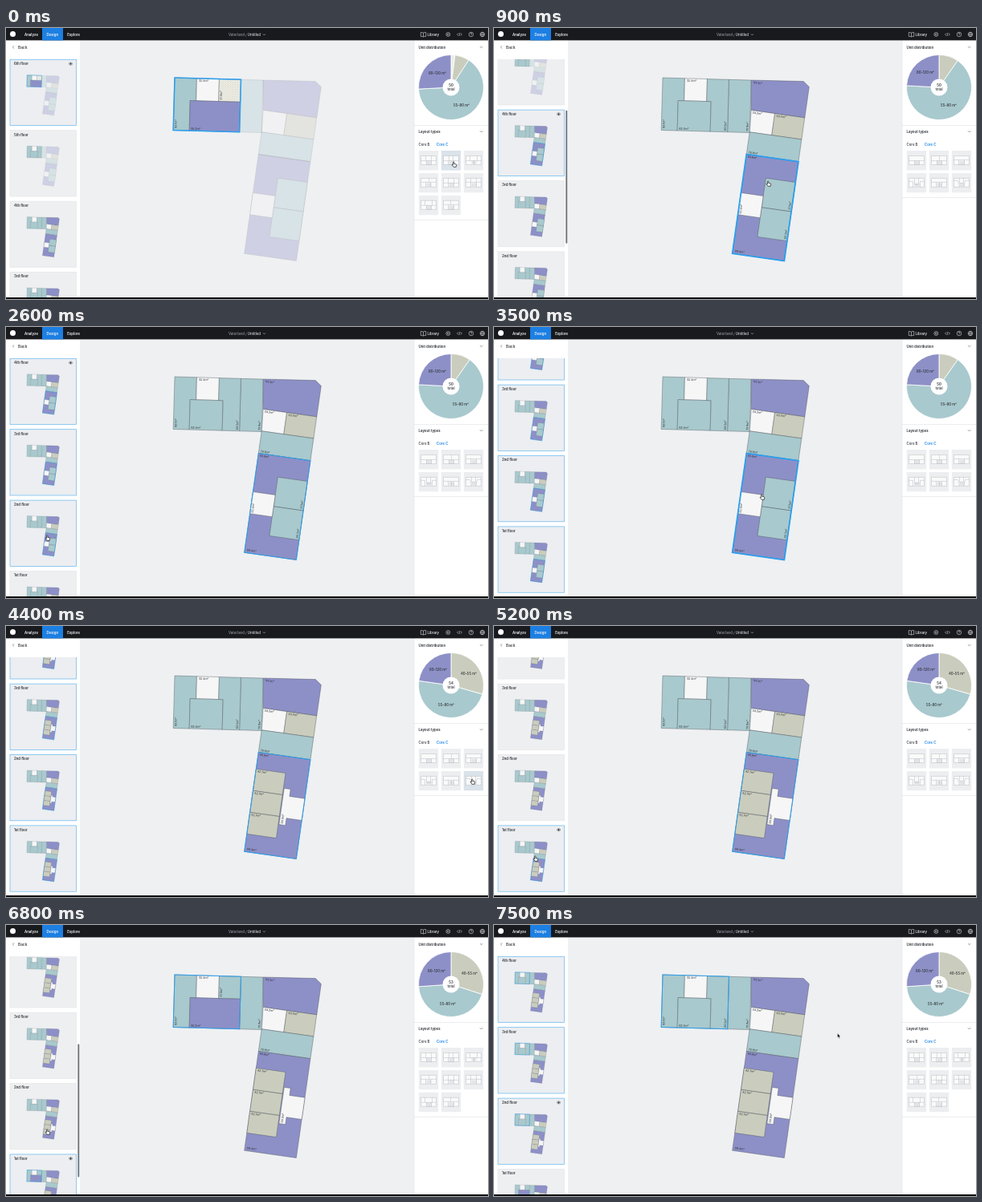
Animation of 600x338 px, one loop 7.6 s. Source, as an HTML page:

```html
<!DOCTYPE html>
<html lang="en">
<head>
<meta charset="utf-8">
<title>Floor plan editor</title>
<style>
html, body { margin: 0; width: 100%; height: 100%; overflow: hidden; background: #eff0f2; }
svg { display: block; width: 600px; height: 338px; }
text { font: 500 4.35px Inter, Roboto, sans-serif; fill: #2b2f34; }
.bold { font-weight: 600; }
.light { fill: #f2f3f5; }
.dim { fill: #9298a0; }
.blue { fill: #1583e9; }
.mid { text-anchor: middle; }
.area { font-size: 3.5px; font-weight: 400; }
.line { fill: none; stroke: #454a50; stroke-width: .55; }
.line.light { stroke: #e4e6e9; fill: none; }
</style>
</head>
<body>
<svg viewBox="0 0 600 338">
  <defs>
    <clipPath id="list"><rect y="39" width="92" height="298"/></clipPath>
    <pattern id="dots" width="3" height="3" patternUnits="userSpaceOnUse">
      <rect width="3" height="3" fill="#eeeee6"/>
      <path d="M0 0h1v1h-1zM1.5 1.5h1v1h-1z" fill="#cfd0bf"/>
    </pattern>
  </defs>
  <rect width="600" height="338" fill="#eff0f2"/>
  <g id="plan"></g>

  <rect y="15" width="92.5" height="323" fill="#fff"/>
  <path d="M92.5 15V338" stroke="#e9ebed" stroke-width=".6"/>
  <path class="line" d="M10 22.4L8.4 24L10 25.6"/>
  <text x="15" y="25.6" style="font-size:4.8px">Back</text>
  <g clip-path="url(#list)"><g id="cards"></g><rect id="bar" x="89.3" width="2" height="166" rx="1" fill="#73777c"/></g>

  <rect x="508" y="15" width="92" height="323" fill="#fff"/>
  <path d="M508 15V338M508 121.5H600" stroke="#e3e5e8" stroke-width=".7"/>
  <text class="bold" x="513.5" y="25.6">Unit distribution</text>
  <text class="bold" x="513.5" y="131">Layout types</text>
  <path class="line" d="M590 23l1.7 1.7l1.7-1.7M590 128.3l1.7 1.7l1.7-1.7"/>
  <text x="513.5" y="146.7">Core B</text>
  <text class="blue bold" x="536" y="146.7">Core C</text>
  <g id="pie"></g>
  <g id="options"></g>

  <rect width="600" height="15.4" fill="#181a1e"/>
  <rect x="45" width="26" height="15.4" fill="#1c7fe3"/>
  <circle cx="8.5" cy="7.6" r="3.5" fill="#fff"/>
  <text class="light bold" x="23" y="9.5">Analyze</text>
  <text class="light bold" x="50.5" y="9.5">Design</text>
  <text class="light bold" x="76.2" y="9.5">Explore</text>
  <text class="dim" x="277" y="9.5">Vaterland / <tspan fill="#d9dce0">Untitled</tspan></text>
  <path class="line light" d="M320 7.5l1.4 1.4l1.4-1.4"/>
  <text class="light" x="524.5" y="9.5">Library</text>
  <g class="line light">
    <path d="M519.5 6v5M516.3 5.5q1.8-.4 3.2.7q1.4-1.1 3.2-.7v5q-1.8-.4-3.2.6q-1.4-1-3.2-.6z"/>
    <circle cx="550.3" cy="8" r="2.5"/><circle cx="550.3" cy="8" r="1"/>
    <path d="M563 6.4L561.6 8L563 9.6M566 6.4L567.4 8L566 9.6M565 6L564 10"/>
    <circle cx="579" cy="8" r="2.8"/><path d="M578.1 7.3q0-1 .9-1t.9.9q0 .6-.9 1.1v.4M579 9.4v.4"/>
    <circle cx="593" cy="8" r="2.8"/><ellipse cx="593" cy="8" rx="1.2" ry="2.8"/><path d="M590.2 8h5.6"/>
  </g>
  <rect y="336" width="600" height="2" fill="#08090a"/>
  <g id="cursor"></g>
</svg>
<script>
const $ = id => document.getElementById(id);
const LOOP = 7600, PITCH = 88.4;
const TEAL = '#a8c9cd', PURPLE = '#8d90c7', SAGE = '#cacdbd', WHITE = '#f6f6f7', BLUE = '#2b9fee';
const LEFT = 'translate(210 62) rotate(1.6)', RIGHT = 'translate(314.3 157.5) rotate(8.1)';

// unit: [path, fill, area, label x, label y, vertical]
const box = (x, y, w, h) => `M${x} ${y}h${w}v${h}h${-w}z`;
const side = ['M0 0h27.5v28h-7.5v37.5h-20z', TEAL, '83.1', 4.2, 63, 1];
const stair = [box(27.5, 0, 28, 28), WHITE, '32.4', 30, 4];
const west = {
  U: [side, stair,
    [box(20, 28, 41, 37.5), TEAL, '63.0', 22, 64],
    ['M55.5 0h27v65.5h-21.5v-37.5h-5.5z', TEAL, '83.5', 80.8, 64, 1]],
  P: [side, stair,
    [box(55.5, 0, 27, 28), 'url(#dots)', '31.9', 59.5, 26, 1],
    [box(20, 28, 62.5, 37.5), PURPLE, '95.2', 22, 64]],
  Q: [side, stair,
    [box(55.5, 0, 27, 28), TEAL, '31.9', 59.5, 26, 1],
    [box(20, 28, 62.5, 37.5), PURPLE, '95.2', 22, 64]]
};
const strip = [[box(82.5, 0, 27.8, 65.5), TEAL, '79.8', 108.3, 64, 1]];
const north = [
  ['M-7.1-92.4L57.5-100L65.4-94.2V-55.3H-2z', PURPLE, '116.1', -4.5, -88.8],
  ['M-2-55.3H27.8V-28H0z', WHITE, '34.2', 0, -51.4],
  [box(27.8, -55.3, 37.5, 27.3), SAGE, '43.0', 30, -51.4],
  [box(0, -28, 65.3, 28), TEAL, '79.8', 2, -1.5]
];
const hall = [box(0, 0, 65.3, 125), PURPLE, '96.8', 1.8, 4];
const hallEnd = ['', PURPLE, '98.4', 2.5, 122.6];
const south = {
  O: [hall, hallEnd,
    [box(28, 26, 37.3, 37), TEAL, '57.1', 63.6, 61, 1],
    [box(28, 63, 37.3, 37), TEAL, '60.7', 63.6, 98, 1],
    [box(0, 48.5, 28, 27.5), WHITE, '52.4', 4, 74.5, 1]],
  N: [hall, hallEnd,
    ...[21, 48.3, 75.6].map(y => [box(0, y, 37, 27.3), SAGE, '42.7', 2, y + 4]),
    ['M38 40h8v9h19.3v27.5h-19.3v9h-8z', WHITE, '36.3', 42.6, 84, 1]]
};

function units(list, frame, pen, labels, alpha = 1) {
  const parts = list.map(([d, fill, area, x, y, up]) =>
    (d && `<path d="${d}" fill="${fill}" stroke="#4a5057" stroke-width="${pen}"/>`) +
    (labels ? `<text class="area" transform="translate(${x} ${y})${up ? ' rotate(-90)' : ''}">${area}m²</text>` : ''));
  return `<g transform="${frame}" opacity="${alpha}">${parts.join('')}</g>`;
}

function building(floor, s, pen, labels, ring) {
  const draft = floor > 4, alpha = draft ? .32 : 1;
  const full = labels && !draft;
  const a = floor == 6 ? s.six : floor == 1 ? s.one : 'U';
  const mark = ring && (s.block == 'A'
    ? `<path transform="${LEFT}" d="${box(0, 0, 82.5, 65.5)}"`
    : `<path transform="${RIGHT}" d="${box(0, 0, 65.3, 125)}"`) + ` fill="none" stroke="${BLUE}" stroke-width="${ring}"/>`;
  return units(strip, LEFT, pen, full, alpha) + units(north, RIGHT, pen, full, alpha) +
    units(south[draft ? 'O' : s.south], RIGHT, pen, full, alpha) +
    units(west[a], LEFT, pen, labels) + (mark || '');
}

function card(floor, s) {
  const on = s.picked.includes(floor), y = 39.3 + (6 - floor) * PITCH;
  const name = floor + (['', 'st', 'nd', 'rd'][floor] || 'th') + ' floor';
  const eye = floor == s.active
    ? '<path class="line" d="M73 5.3q2.5-3.2 5 0q-2.5 3.2-5 0z"/><circle cx="75.5" cy="5.3" r=".9"/>' : '';
  return `<g transform="translate(5 ${y})">
    <rect width="82.4" height="82.3" fill="${on ? '#eceef1' : '#eeeff1'}" stroke="${on ? '#63b6ef' : '#e4e6e9'}" stroke-width=".7"/>
    <text class="bold" x="5" y="6.9">${name}</text>${eye}
    <g transform="translate(21 19.5) scale(.22) translate(-208.5 -62)">${building(floor, s, .7, false, on && 2)}</g></g>`;
}

const polar = (deg, r) => {
  const a = (deg - 90) * Math.PI / 180;
  return `${554 + r * Math.cos(a)} ${74 + r * Math.sin(a)}`;
};
function pie(total, cuts, spots) {
  const fills = ['#ececea', SAGE, TEAL, PURPLE];
  const names = ['', '40–55', '55–80', '80–120'];
  const ends = [0, ...cuts, 360];
  let out = '';
  fills.forEach((fill, i) => {
    const from = ends[i], to = ends[i + 1];
    if (to > from) out += `<path d="M554 74L${polar(from, 40.5)}A40.5 40.5 0 ${+(to - from > 180)} 1 ${polar(to, 40.5)}z" fill="${fill}" stroke="#fff" stroke-width=".8"/>`;
  });
  spots.forEach(([i, x, y]) => out += `<text class="mid" x="${x}" y="${y}">${names[i]} m²</text>`);
  return out + `<circle cx="554" cy="74" r="10.5" fill="#fff"/>
    <text class="mid bold" x="554" y="73.3">${total}</text><text class="mid" x="554" y="78.2">total</text>`;
}
const pies = {
  start: pie(50, [7, 33, 267], [[3, 537, 57.5], [2, 567, 97.5]]),
  even: pie(50, [0, 35, 273], [[3, 537, 57], [2, 566, 98]]),
  more: pie(54, [0, 106, 278], [[3, 538, 56], [2, 548, 99.5], [1, 576, 61]]),
  last: pie(53, [0, 108, 266], [[3, 536, 58.5], [2, 550, 99.8], [1, 577, 61.5]])
};

const icons = ['M0 6H6V0M13 0V6H19M6 6H13M7 6V11H13V6', 'M0 6H19M7 0V6M12 0V6M6 6V11H13V6', 'M0 6H19M5 0V6M14 0V6M10 6V11',
  'M0 5H19M6 5V11M12 5V11M10 0V5', 'M0 6H19M6 0V6M13 0V6M6 6V11M13 6V11', 'M0 5H19M6 0V11M13 0V11',
  'M0 6H5V0M14 0V6H19M5 6H14M7 6V11H13V6', 'M0 5H19M9 0V5M6 5V11H13V5'];
const slim = ['M0 6H19M7 6V11H13V6', 'M0 6H19M7 6V11H13V6M10 0V6', 'M0 5H19M6 5V11H13V5',
  'M0 4H5V11M14 11V4H19M7 0V8H12V0', 'M0 5H19M6 5V11M13 5V11M10 5V11', 'M0 3H5L7 11M12 11L14 3H19M7 0V6H12V0'];
function options(list, hover) {
  const end = 153.2 + Math.ceil(list.length / 3) * 27.9 + 2.5;
  return list.map((d, i) => `<g transform="translate(${513.8 + i % 3 * 28} ${153 + (i / 3 | 0) * 27.9})">
    <rect width="24.4" height="24.4" rx=".6" fill="${i == hover ? '#dae2ea' : '#eceef0'}"/>
    <g transform="translate(2.7 6.5)" stroke="#a9aeb4" stroke-width=".4"><path d="M0 0H19V11H0z" fill="#fafafa"/>
    <path d="M7 6H13V11H7z" fill="#e3e5e8" stroke="none"/><path d="${d}" fill="none"/></g></g>`).join('') +
    `<path d="M508 ${end}H600" stroke="#e3e5e8" stroke-width=".7"/>`;
}

const arrow = '<path d="M-1.5-3V2.6L-.2 1.5L.7 3.5L1.6 3.1L.7 1.2H2.4z" fill="#111" stroke="#fff" stroke-width=".4"/>';
const hand = '<path d="M-1.4-2.8q.8-.8 1.3.2V-.6l2 .4q1 .3.8 1.4L2.2 3.3H-.8L-2.9.8q0-.9 1-.6l.5.5z" fill="#fff" stroke="#15181b" stroke-width=".7"/>';

// each step changes part of the state
const steps = [
  [0, { active: 6, picked: [6], block: 'A', six: 'P', one: 'U', south: 'O', pie: 'start' }],
  [400, { six: 'U', pie: 'even' }],
  [900, { active: 4, picked: [4], block: 'B' }],
  [2100, { picked: [4, 3] }],
  [2500, { picked: [4, 3, 2] }],
  [3000, { picked: [4, 3, 2, 1] }],
  [4300, { south: 'N', pie: 'more' }],
  [5200, { active: 1, picked: [1] }],
  [5600, { block: 'A' }],
  [6200, { one: 'Q', pie: 'last' }],
  [6900, { active: 2, picked: [2] }],
  [7000, { picked: [2, 3] }],
  [7200, { picked: [2, 3, 4] }]
];
const scrolls = [[0, 0], [800, 0], [900, 114], [1500, 176.8], [2600, 176.8], [2900, 232.4], [6600, 232.4], [6900, 176.8], [LOOP, 176.8]];
const moves = [[0, 558, 170], [200, 558, 170], [400, 527, 168], [500, 527, 168], [800, 50, 262], [900, 342, 194],
  [1300, 342, 194], [1800, 52, 162], [2200, 52, 162], [2500, 52, 256], [2700, 52, 270], [3000, 52, 292], [3200, 52, 292],
  [3500, 334, 212], [3700, 334, 212], [4000, 554, 194], [4200, 581, 194], [4900, 581, 194], [5200, 52, 290], [5300, 52, 290],
  [5500, 240, 120], [5800, 240, 120], [6100, 555, 168], [6400, 555, 168], [6700, 52, 260], [6900, 52, 256],
  [7000, 52, 162], [7200, 52, 78], [7300, 90, 84], [7500, 429, 138], [LOOP, 429, 138]];

function at(keys, t) {
  const i = Math.max(1, keys.findIndex(k => k[0] > t));
  const [a, b] = [keys[i - 1], keys[i]];
  const p = (t - a[0]) / (b[0] - a[0]);
  return a.slice(1).map((v, j) => v + (b[j + 1] - v) * p);
}

const cache = {};
function put(id, html) {
  if (cache[id] !== html) $(id).innerHTML = cache[id] = html;
}

function draw(t) {
  const s = Object.assign({}, ...steps.filter(k => k[0] <= t).map(k => k[1]));
  const [x, y] = at(moves, t), [scroll] = at(scrolls, t);
  const over = s.block == 'A' ? x > 208 && x < 292 && y > 62 && y < 130 : x > 300 && x < 378 && y > 160 && y < 290;
  put('plan', building(s.active, s, .4, true, over ? 1.8 : t < 500 ? 1.5 : 1));
  put('cards', [6, 5, 4, 3, 2, 1].map(f => card(f, s)).join(''));
  $('cards').setAttribute('transform', `translate(0 ${-scroll})`);
  $('bar').setAttribute('y', 39 + scroll * .56);
  const moving = scroll != at(scrolls, Math.max(0, t - 300))[0];
  $('bar').setAttribute('opacity', +moving);
  put('pie', pies[s.pie]);
  const col = Math.floor((x - 513.8) / 28), row = Math.floor((y - 153) / 27.9);
  put('options', options(s.block == 'A' ? icons : slim, x > 513 && row >= 0 ? row * 3 + col : -1));
  put('cursor', t >= 7300 ? arrow : hand);
  $('cursor').setAttribute('transform', `translate(${x} ${y})`);
}

const start = performance.now();
function tick() {
  const t = (performance.now() - start) % LOOP;
  draw(Math.floor(t / 100) * 100);
  requestAnimationFrame(tick);
}
tick();
</script>
</body>
</html>
```
